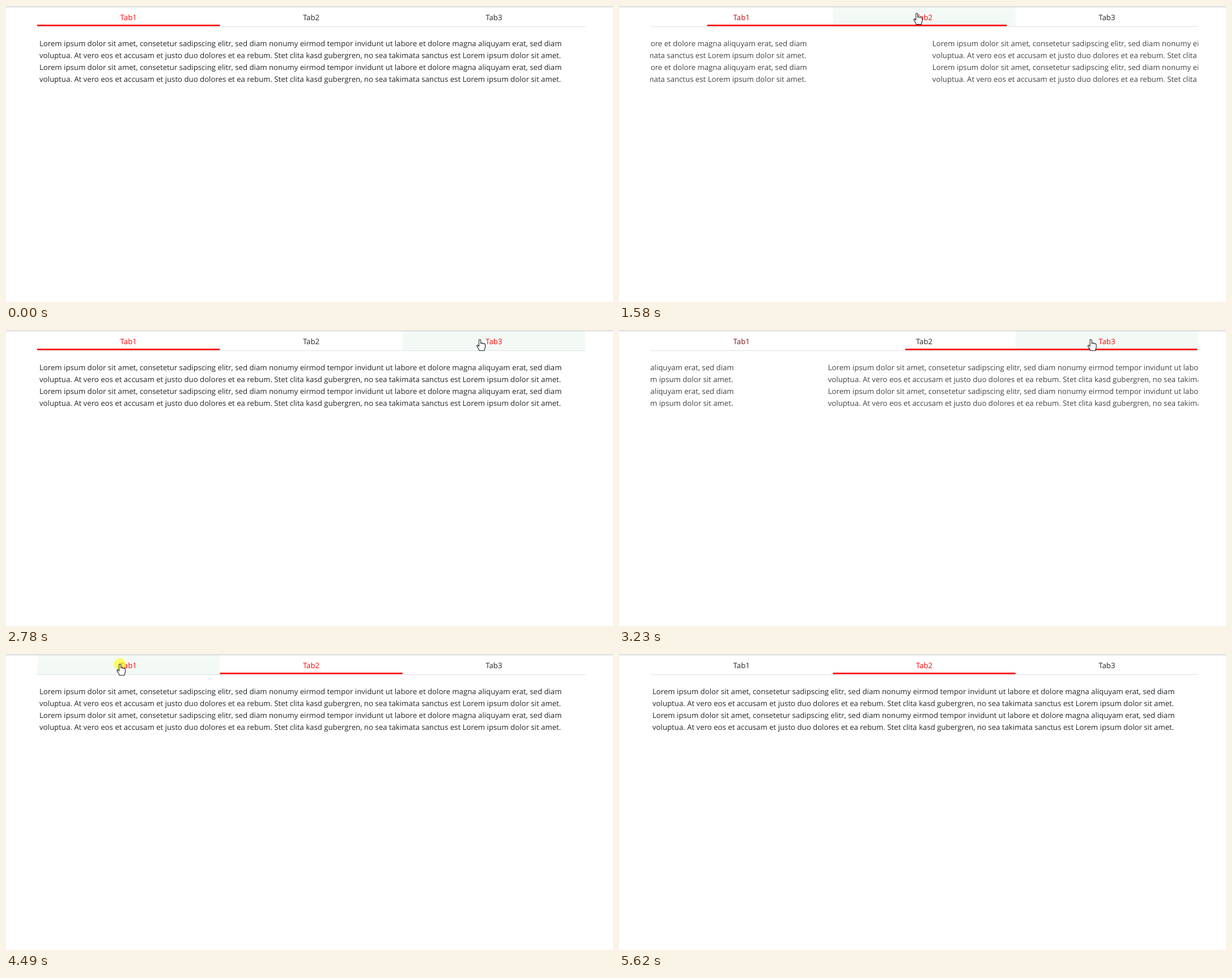
These frames come from a looping animation (1071x523 px, 6140 ms). An HTML page:

```html
<!DOCTYPE html>
<html lang="en">
<head>
<meta charset="utf-8">
<title>Sliding tabs</title>
<style>
html, body { margin: 0; width: 100%; height: 100%; overflow: hidden; background: #fff; }
svg { display: block; }
text { font: 13.21px "Open Sans", "Noto Sans", sans-serif; fill: #212529; text-rendering: geometricPrecision; }
.tab { text-anchor: middle; }
.cursor { fill: #fff; stroke: #222; stroke-width: 1.1; stroke-linejoin: round; }
</style>
</head>
<body>
<svg width="1071" height="523" viewBox="0 0 1071 523">
  <defs>
    <clipPath id="view"><rect x="55" y="40" width="967" height="110"/></clipPath>
    <g id="panel"></g>
  </defs>
  <rect y="1" width="1071" height="1" fill="#bfbfbf"/>
  <g id="tabs"></g>
  <rect x="55" y="36" width="967" height="1" fill="#dee2e6"/>
  <rect id="bar" y="33" height="2.6" fill="#f00"/>
  <g clip-path="url(#view)">
    <use id="leaving" href="#panel"/>
    <use id="entering" href="#panel"/>
  </g>
  <g id="pointer">
    <circle id="press" r="10.5" fill="#ff0" fill-opacity=".6"/>
    <path id="hand" class="cursor" d="M-1.5 12V1.5a1.6 1.6 0 0 1 3.2 0V7c0-1.5 2.8-1.5 2.8.3c.2-1.3 2.6-1.1 2.6.5c.3-1 2.4-.8 2.4.8V13c0 3-1.5 4-1.5 6.5H-1C-1 17-4 14.5-5 11.5c-.6-1.8 1.5-2.3 2.3-.7z"/>
    <path id="arrow" class="cursor" d="M0 0V16.5L4 13L6.5 18.5L9 17.4L6.5 12H11.5Z"/>
  </g>
</svg>
<script>
const LOOP = 6140, LEFT = 55, WIDTH = 967, TAB = WIDTH / 3;
const SLIDE = 500, SLIDE_LAG = 52, BAR = 270, BAR_LAG = 140, FADE = 200;

const clicks = [[1385, 1], [2065, 0], [2980, 2], [3773, 1], [4500, 0], [5060, 1]]; // time, tab
const path = [ // time, x, y
  [240, 884, 445], [830, 521, 10], [980, 521, 10], [1100, 527, 13],
  [1560, 527, 13], [1980, 307, 16], [2270, 307, 16], [2735, 836, 17],
  [3200, 836, 17], [3680, 549, 14], [3960, 549, 14], [4400, 201, 18],
  [4620, 201, 18], [4960, 538, 16], [5130, 538, 16], [5550, 560, 262]
];
const lines = [
  "Lorem ipsum dolor sit amet, consetetur sadipscing elitr, sed diam nonumy eirmod tempor invidunt ut labore et dolore magna aliquyam erat, sed diam",
  "voluptua. At vero eos et accusam et justo duo dolores et ea rebum. Stet clita kasd gubergren, no sea takimata sanctus est Lorem ipsum dolor sit amet."
];

const $ = id => document.getElementById(id);
const clamp = v => Math.min(1, Math.max(0, v));
const mix = (a, b, p) => a + (b - a) * p;
const show = (el, on) => el.setAttribute("visibility", on ? "visible" : "hidden");

function add(parent, tag, attrs, text = "") {
  const el = document.createElementNS("http://www.w3.org/2000/svg", tag);
  for (const key in attrs) el.setAttribute(key, attrs[key]);
  el.textContent = text;
  return parent.appendChild(el);
}

// cubic-bezier(.25, .1, .25, 1)
function ease(x) {
  x = clamp(x);
  const bezier = (a, b, s) => 3 * (1 - s) ** 2 * s * a + 3 * (1 - s) * s * s * b + s ** 3;
  let lo = 0, hi = 1;
  for (let i = 0; i < 24; i++) {
    const mid = (lo + hi) / 2;
    if (bezier(.25, .25, mid) < x) lo = mid; else hi = mid;
  }
  return x === 1 ? 1 : bezier(.1, 1, lo);
}

function cursorAt(t) {
  const i = path.findIndex(k => k[0] > t);
  if (i < 1) return null;
  const [a, b] = [path[i - 1], path[i]];
  const s = (t - a[0]) / (b[0] - a[0]), p = s * s * (3 - 2 * s);
  return [mix(a[1], b[1], p), mix(a[2], b[2], p)];
}

function hoverAt(t) {
  const c = cursorAt(t);
  return c && t > 960 && c[1] < 36 ? Math.floor((c[0] - LEFT) / TAB) : -1;
}

function stateAt(t) {
  let from = 0, to = 0, start = -LOOP;
  for (const [time, tab] of clicks) if (time <= t) [from, to, start] = [to, tab, time];
  return { from, to, age: t - start };
}

// Share of the last FADE ms in which the condition held
function faded(t, test) {
  const n = 20;
  let sum = 0;
  for (let i = 0; i < n; i++) sum += test(t - i * FADE / n);
  return sum / n;
}

for (let i = 0; i < 4; i++) add($("panel"), "text", { x: 59, y: 71 + 21 * i }, lines[i % 2]);
const tabs = [0, 1, 2].map(i => ({
  back: add($("tabs"), "rect", { x: LEFT + TAB * i, y: 2, width: TAB, height: 34, fill: "#f3faf6" }),
  label: add($("tabs"), "text", { class: "tab", x: LEFT + TAB * (i + .5), y: 25 }, "Tab" + (i + 1))
}));

function draw(t) {
  const { from, to, age } = stateAt(t);

  tabs.forEach(({ back, label }, i) => {
    const red = faded(t, u => hoverAt(u) === i || stateAt(u - BAR_LAG).to === i);
    label.style.fill = `rgb(${mix(33, 255, red)},${mix(37, 0, red)},${mix(41, 0, red)})`;
    back.setAttribute("opacity", faded(t, u => hoverAt(u) === i));
  });

  const lead = mix(from, to, ease(age / BAR));
  const trail = mix(from, to, ease((age - BAR_LAG) / BAR));
  $("bar").setAttribute("x", LEFT + TAB * Math.min(lead, trail));
  $("bar").setAttribute("width", TAB * (1 + Math.abs(lead - trail)));

  const dir = Math.sign(to - from), moving = age < SLIDE + SLIDE_LAG;
  $("leaving").setAttribute("x", -dir * WIDTH * ease(age / SLIDE));
  $("entering").setAttribute("x", dir * WIDTH * (1 - ease((age - SLIDE_LAG) / SLIDE)));
  show($("leaving"), moving && dir);
  for (const id of ["leaving", "entering"]) $(id).setAttribute("opacity", moving ? .86 : 1);

  const c = cursorAt(t), over = hoverAt(t) >= 0;
  if (c) $("pointer").setAttribute("transform", `translate(${c})`);
  show($("hand"), c && over);
  show($("arrow"), c && !over);
  show($("press"), clicks.some(([time]) => t > time - 70 && t < time + 10));
}

const begin = performance.now();
function tick() {
  draw((performance.now() - begin) % LOOP);
  requestAnimationFrame(tick);
}
tick();
</script>
</body>
</html>
```
